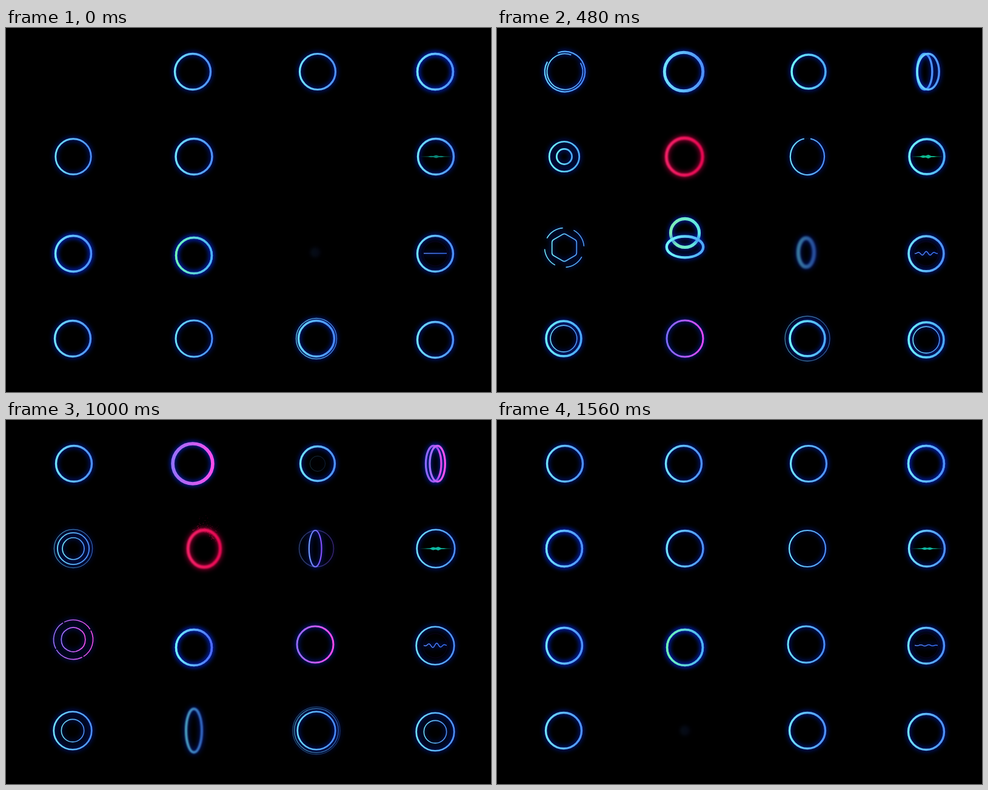
Recreate the animation shown at these times as an HTML page with a canvas. Size 800 by 600 pixels, loop 1600 ms.

```html
<!DOCTYPE html>
<html>
<head>
<meta charset="utf-8">
<title>Ring loaders</title>
<style>
html, body { margin: 0; width: 100%; height: 100%; overflow: hidden; background: #000; }
canvas { display: block; }
</style>
</head>
<body>
<canvas id="stage" width="800" height="600"></canvas>
<script>
const ctx = document.getElementById('stage').getContext('2d');
const LOOP = 1600, STEP = 40, REST = 29.5, TAU = Math.PI * 2;
let t = 0;

// Timing helpers: linear ramp, smooth ramp, and a smooth pulse around a moment
const ramp = (from, to, time = t) => Math.min(1, Math.max(0, (time - from) / (to - from)));
const ease = (from, to, time = t) => {
  const x = ramp(from, to, time);
  return x * x * (3 - 2 * x);
};
const bump = (center, width, time = t) => {
  const d = Math.abs(time - center) / width;
  return d < 1 ? Math.cos(d * Math.PI / 2) ** 2 : 0;
};
const rad = degrees => degrees * TAU / 360;
const random = seed => {
  const s = Math.sin(seed * 127.1) * 43758.5453;
  return s - Math.floor(s);
};

// Hue pairs run from the left to the right edge of a ring
const violet = p => [190 + 72 * p, 217 + 95 * p];
const BLUE = violet(0);
const yellow = () => bump(640, 190);
const green = () => bump(1200, 190);
const beatHue = () => [190 - 154 * yellow() - 95 * green(), 217 - 154 * yellow() - 72 * green()];
const dusk = () => ease(480, 1100) - ease(1200, 1540);

function paint(x, r, { w = 3.4, hue = BLUE, sat = 93, light = 71, a = 1, blur = 0, glow = '#0030ff' }) {
  const g = ctx.createLinearGradient(x - r, 0, x + r, 0);
  g.addColorStop(0, `hsl(${hue[0]},${sat}%,${light}%)`);
  g.addColorStop(1, `hsl(${hue[1]},${sat}%,${light - 7}%)`);
  ctx.strokeStyle = g;
  ctx.lineWidth = w;
  ctx.globalAlpha = a;
  ctx.shadowColor = glow;
  ctx.shadowBlur = 9;
  ctx.filter = blur > 0.1 ? `blur(${blur}px)` : 'none';
  ctx.stroke();
}

function ring(x, y, o = {}) {
  const { r = REST, ry = r, half = 180, turn = 90, dash = 1, a = 1 } = o;
  if (a < 0.01 || half <= 0) return;
  ctx.save();
  ctx.beginPath();
  ctx.ellipse(x, y, r, ry, 0, rad(turn - half), rad(turn + half));
  if (dash < 0.99) ctx.setLineDash([TAU * r / 4 * dash, TAU * r / 4 * (1 - dash)]);
  paint(x, r, o);
  ctx.restore();
}

// Hexagon whose corners can round off into a circle
function hexagon(x, y, apothem, roundness, o) {
  const R = apothem / Math.cos(TAU / 12);
  const point = i => [x + R * Math.sin(i * TAU / 6), y - R * Math.cos(i * TAU / 6)];
  ctx.save();
  ctx.beginPath();
  ctx.moveTo(x - apothem * Math.sin(TAU / 12), y - apothem * Math.cos(TAU / 12));
  for (let i = 0; i < 6; i++) ctx.arcTo(...point(i), ...point(i + 1), apothem * Math.min(roundness, 0.998));
  ctx.closePath();
  paint(x, apothem, o);
  ctx.restore();
}

// Shared heartbeat: two squeezes, then a burst; the line thins as the ring grows
function heartbeat(x, y, hue) {
  const r = REST - 1.3 * bump(320, 300) - 2.5 * bump(840, 150) + 5 * bump(1190, 320);
  ring(x, y, { r, w: 3.4 - (r - REST) * 0.4, hue });
}

function closingArcs(x, y) {
  const half = 180 * (1 - (1 - ramp(0, 700)) ** 1.9), spin = 90 * ease(340, 640);
  ring(x, y, { r: REST + 12 * (1 - ramp(0, 840)) ** 1.4, w: 1.2 + 2.2 * ramp(0, 1000), half, turn: 90 - spin });
  ring(x, y, { w: 1.8, half, turn: 90 + spin, a: 1 - ramp(640, 840) });
}

function swelling(x, y) {
  const swell = bump(800, 650);
  ring(x, y, { r: REST + 4.4 * swell, w: 3.4 + 2.8 * swell, hue: violet(dusk()) });
}

function innerPulse(x, y) {
  const squeeze = 3.5 * bump(320, 300) + 4.3 * bump(1200, 300);
  ring(x, y, { r: REST - squeeze, w: 3.2 + 0.2 * squeeze, hue: beatHue() });
  const phase = (t - 580) / 340 % 1;
  if (t > 580 && t < 1260) ring(x, y, { r: 10 + 11 * phase, w: 1, a: 0.1 + 0.5 * phase });
}

function gyroscope(x, y) {
  const hue = violet(dusk());
  const spin = (angle, sway) => ring(x + sway * Math.abs(Math.sin(angle)), y,
    { r: Math.max(2.5, REST * Math.abs(Math.cos(angle))), ry: REST, hue });
  spin(TAU * ease(80, 1560), -3);
  spin(TAU / 2 * (ramp(0, 1560) - 0.06 * bump(640, 250)), 4);
}

// Rings are born in the centre, swell midway, and fade beyond the rim; the last two settle on it
function ripples(x, y) {
  for (const [birth, heft] of [[-650, 5], [-70, 5], [200, 7], [420, 5], [600, 0.5]]) {
    const grown = 36 * (t - birth) / 800, over = Math.max(0, grown - REST);
    const settles = birth > 400;
    const r = settles ? Math.min(grown, REST) : grown - over * 0.67;
    if (r < 5) continue;
    const w = 1.3 + heft * Math.max(0, 1 - Math.abs(r - 19) / 8) + 2 * Math.max(0, 1 - Math.abs(r - REST));
    ring(x, y, { r, w, hue: beatHue(), a: Math.max(0, ramp(5, 12, r) - (r - REST > 0 ? (r - REST) / 6 : 0)) });
  }
}

function sparks(x, y) {
  ctx.save();
  ctx.fillStyle = '#f0105c';
  for (let i = 1; i <= 150; i++) {
    const age = (t - 620 - 560 * random(i)) / (220 + 180 * random(i + 300));
    if (age < 0 || age > 1) continue;
    const angle = -0.4 - 1.3 * random(i + 600);
    ctx.globalAlpha = (1 - age) * 0.7;
    ctx.fillRect(x + 31 * Math.cos(angle) + 14 * age, y + 31 * Math.sin(angle) - 34 * age * random(i + 900), 1.1, 1.1);
  }
  ctx.restore();
}

function shaken(x, y) {
  const heat = ease(60, 240) - ease(1380, 1540);
  const swing = 20 * (bump(930, 270) - bump(620, 160));
  ring(x + swing, y, {
    r: 30 - Math.abs(swing) * 0.2, ry: REST + heat, w: 3.4 + 1.4 * heat,
    hue: [190 + 150 * heat, 217 + 123 * heat], light: 71 - 16 * heat, blur: 1.1 * heat,
    glow: `hsl(${230 + 110 * heat},100%,48%)`
  });
  sparks(x, y);
}

function spinner(x, y) {
  const hue = violet(ease(700, 1350) - ease(1350, 1560)), cx = x - 2 * bump(900, 500);
  ring(cx, y, { r: 30 - 11.7 * bump(700, 300) - 20 * bump(980, 240), ry: 30, w: 2.2, half: 180 * ramp(0, 510), hue });
  ring(x, y, { r: 30 - 18.5 * bump(740, 320), ry: 30, w: 1.7, a: 0.5 * bump(850, 460), hue });
}

function voice(x, y) {
  heartbeat(x, y, beatHue());
  const shift = -0.35 * yellow() - 0.25 * green(), amp = 1.9 + Math.sin(Math.PI * t / LOOP);
  ctx.save();
  ctx.fillStyle = `hsl(${172 - 114 * yellow() - 57 * green()},85%,43%)`;
  ctx.globalAlpha = 0.65 + 0.25 * ramp(0, 200);
  for (let i = -27; i <= 27; i++) {
    const u = i / 27, bell = Math.exp(-(((u - shift) * 2.9) ** 2));
    const h = 0.45 * (1 - u * u) + amp * bell * (0.72 + 0.28 * Math.cos(u * 17 + t * 0.01));
    ctx.fillRect(x + i, y - h, 1, h * 2);
  }
  ctx.restore();
}

function hexLoader(x, y) {
  const lift = ease(0, 250) - ease(1020, 1190), cool = 38 * bump(320, 200);
  const hue = violet(dusk()).map(h => h - cool), cy = y - 10 * lift;
  ring(x, cy, {
    r: REST + 3 * lift, w: 3.3 - 1.7 * lift, hue,
    dash: 1 - 0.5 * bump(640, 450), turn: 246 + 0.24 * (t - 640)
  });
  const shrink = ease(0, 300) - ease(1020, 1540);
  hexagon(x, cy, REST - 9.7 * shrink + 1.8 * bump(320, 250), 1 - 0.75 * bump(540, 500), { w: 3.3 - 1.6 * shrink, hue });
}

function bouncing(x, y) {
  const hop = ease(0, 300) * (1 - ease(340, 760)), cool = 50 * bump(900, 240) - 58 * green();
  const hue = [150 + cool, 205 - 35 * hop + 0.8 * cool];
  ring(x, y - 50 * hop, { r: REST - 8 * hop, w: 3.4 + 2.2 * hop, hue, sat: 93 - 25 * hop });
  ring(x, y - 19 * hop, { r: REST + hop, ry: REST - 22 * hop * hop, w: 3.4 + 1.2 * hop, hue: hue.map(h => h + 40 * hop) });
}

// A blurred dot stretches into a tall ellipse and opens up; time can also run backwards
function portal(x, y, time, hue) {
  const focus = ease(300, 680, time), born = 4 + 9 * ease(0, 300, time);
  ring(x, y, {
    r: born + 17 * ease(640, 840, time),
    ry: born + 17 * ease(350, 640, time) + 9 * bump(640, 280, time),
    w: 9 - 6 * focus, a: 0.06 + 0.32 * ramp(0, 320, time) + 0.62 * ease(300, 800, time),
    blur: 2.5 * (1 - focus) + 1.2 * bump(640, 180, time), sat: 45 + 48 * focus, light: 58 + 12 * focus, hue
  });
  ring(x, y, { r: 60 - 29 * ramp(640, 1000, time), w: 2, a: 0.3 * bump(840, 170, time), hue: [265, 300], light: 60 });
}

function emerging(x, y) {
  portal(x, y, t, violet(dusk()));
}

function vanishing(x, y) {
  const hue = violet(0.8 * (ease(100, 320) - ease(650, 980)));
  portal(x, y, (1560 - t) * 1.03, hue);
  ring(x, y, { r: 32.3, w: 2.4, a: 0.8 * bump(640, 160), hue });
}

function wave(x, y) {
  heartbeat(x, y, BLUE);
  ring(x, y, { r: 20, w: 1, a: 0.1, hue: [260, 280], light: 50 });
  const amp = 3.6 * ease(0, 200) * (1 - 0.65 * bump(620, 200)) * (1 - 0.7 * ease(1300, 1560));
  ctx.save();
  ctx.beginPath();
  for (let i = -19; i <= 19; i++) {
    const u = i / 19;
    ctx.lineTo(x + i, y - 0.5 + amp * (1 - u * u) * Math.sin(u * 9 + t * 0.0098));
  }
  paint(x, 19, { w: 1.5, hue: [222, 222], light: 66 });
  ctx.restore();
}

function target(x, y) {
  heartbeat(x, y, beatHue());
  ring(x, y, {
    r: 18.2 + 6 * bump(600, 280) + 11 * ease(950, 1350), w: 1.6,
    a: ease(100, 300) * (1 - ease(1250, 1540))
  });
  ring(x, y, { r: 24, w: 1.3, a: 0.6 * (bump(320, 200) + bump(840, 140)) });
}

function echo(x, y) {
  heartbeat(x, y, beatHue());
  for (const birth of [-120, 220, 610, 770]) {
    const left = 1 - (t - birth) / 600;
    if (left > 0 && left < 1) ring(x, y, { r: REST + 11 * (1 - left * left), w: 1 + 0.6 * left, a: left });
  }
}

function frame(now) {
  t = Math.floor(now % LOOP / STEP) * STEP;
  ctx.fillStyle = '#000';
  ctx.fillRect(0, 0, 800, 600);
  closingArcs(112, 72);
  swelling(308, 72);
  innerPulse(514, 72);
  gyroscope(708, 72);
  ripples(111, 212);
  shaken(310, 212);
  spinner(512, 212);
  voice(709, 212);
  hexLoader(111, 372);
  bouncing(310, 375);
  emerging(510, 370);
  wave(708, 372);
  target(110, 512);
  vanishing(310, 512);
  echo(512, 512);
  target(708, 514);
  requestAnimationFrame(frame);
}
requestAnimationFrame(frame);
</script>
</body>
</html>
```
